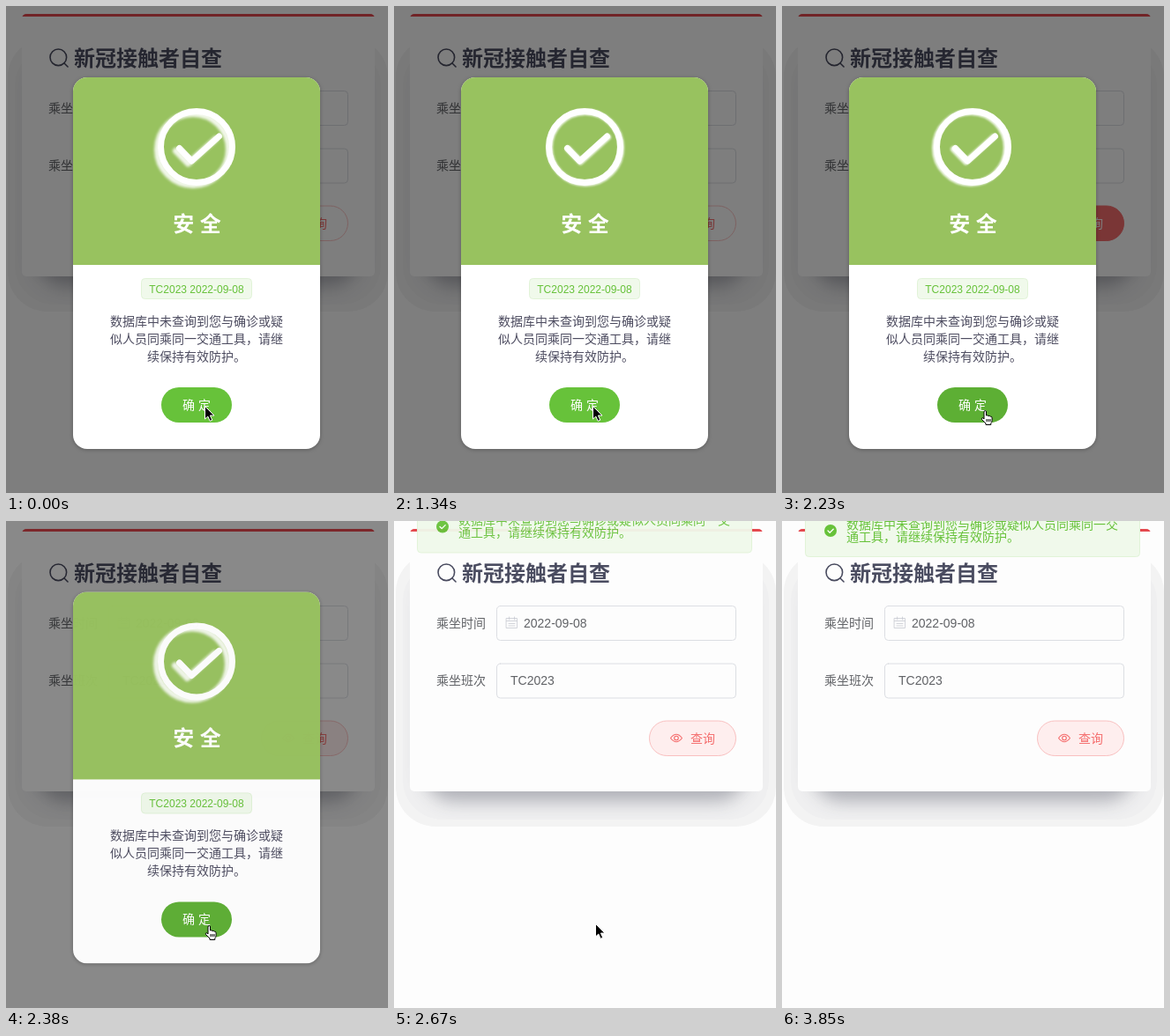
An HTML page for the animation above (4.6 s loop, 433 by 553 pixels).

```html
<!DOCTYPE html>
<html lang="zh">
<head>
<meta charset="utf-8">
<style>
html, body { margin: 0; width: 100%; height: 100%; overflow: hidden; background: #fdfdfd; }
svg { display: block; width: 433px; height: 553px; font: 14px "Liberation Sans", "Noto Sans CJK SC", sans-serif; }
text { white-space: pre; }
.bold { font-size: 24px; font-weight: bold; }
.mid { text-anchor: middle; }
.line { fill: none; stroke-linecap: round; stroke-linejoin: round; }
.card { filter: drop-shadow(0 1px 2px #0004); }
</style>
</head>
<body>
<svg viewBox="0 0 433 553">
  <defs>
    <filter id="soft" x="-20%" y="-20%" width="140%" height="140%"><feGaussianBlur stdDeviation="10"/></filter>
    <clipPath id="round"><rect x="76" y="81" width="280" height="422" rx="16"/></clipPath>
    <clipPath id="panel"><rect x="18" y="9" width="400" height="298" rx="5"/></clipPath>
  </defs>

  <!-- search form -->
  <rect x="2" y="36" width="431" height="311" rx="45" fill="#f3f3f3"/>
  <rect x="10" y="46" width="415" height="293" rx="45" fill="#efeff0"/>
  <rect x="34" y="60" width="366" height="258" rx="34" fill="#3a3c50" opacity=".36" filter="url(#soft)"/>
  <g clip-path="url(#panel)">
    <rect x="18" y="9" width="400" height="298" fill="#fdfdfd"/>
    <rect x="18" y="9" width="400" height="3" fill="#e4484e"/>
  </g>
  <g class="line" stroke="#484a5e" stroke-width="1.6">
    <circle cx="59.3" cy="58.3" r="9.3"/><path d="M66 65l4 4"/>
  </g>
  <text class="bold" x="77" y="67.5" fill="#4a4c60">新冠接触者自查</text>
  <g fill="#606266">
    <text x="48" y="121">乘坐时间</text><text x="48" y="186">乘坐班次</text>
    <text x="147" y="120.5">2022-09-08</text><text x="132" y="186">TC2023</text>
  </g>
  <g class="line" stroke="#dcdee3">
    <rect x="116.5" y="96.5" width="271" height="39" rx="4"/>
    <rect x="116.5" y="162" width="271" height="39" rx="4"/>
  </g>
  <path class="line" stroke="#c8cbd2" stroke-width=".8" d="M127.5 110.5h12v11h-12zM127.5 113.5h12M130.5 109v3M136.5 109v3M130 116.5h7M130 119h7"/>
  <g id="query">
    <rect id="pill" x="289.5" y="227" width="98" height="39.5" rx="19.75"/>
    <g class="line" stroke="currentColor" stroke-width="1.1">
      <path d="M313.5 246.5q6.5-8.5 13 0q-6.5 8.5-13 0z"/><circle cx="320" cy="246.5" r="2.3"/>
    </g>
    <text x="336" y="251.5" fill="currentColor">查询</text>
  </g>

  <!-- success message -->
  <g id="toast">
    <rect x="26.5" y="-18.5" width="379" height="59" rx="4" fill="#f0f9eb" stroke="#e1f3d8"/>
    <circle cx="55" cy="11" r="7" fill="#67c23a"/>
    <path class="line" stroke="#fff" stroke-width="1.3" d="M52 11l2.2 2.2 4-4"/>
    <g fill="#67c23a">
      <text x="73" y="9">数据库中未查询到您与确诊或疑似人员同乘同一交</text>
      <text x="73" y="23">通工具，请继续保持有效防护。</text>
    </g>
  </g>

  <!-- result dialog -->
  <rect id="shade" width="433" height="553"/>
  <g id="dialog">
    <g class="card"><g clip-path="url(#round)">
      <rect x="76" y="81" width="280" height="422" fill="#fff"/>
      <rect x="76" y="81" width="280" height="213" fill="#98c25f"/>
    </g></g>
    <g id="badge" class="line" stroke="#fff" stroke-width="7">
      <circle cx="216" cy="160" r="40.5"/><path d="M196.5 161.5l14 14.5 31-28"/>
    </g>
    <text class="bold mid" x="216.5" y="255.5" fill="#fff">安 全</text>
    <rect x="153.5" y="309.5" width="125" height="23" rx="4" fill="#f0f9eb" stroke="#e1f3d8"/>
    <text class="mid" x="216" y="325.5" font-size="12" fill="#67c23a">TC2023 2022-09-08</text>
    <g class="mid" fill="#4d4c60">
      <text x="216" y="363">数据库中未查询到您与确诊或疑</text>
      <text x="216" y="383">似人员同乘同一交通工具，请继</text>
      <text x="216" y="403">续保持有效防护。</text>
    </g>
    <rect id="ok" x="176" y="433" width="80" height="40" rx="20"/>
    <text class="mid" x="216" y="458" fill="#fff">确 定</text>
  </g>

  <path id="arrow" stroke="#fff" d="M.5.5v14.5l3.300-3 2.400 5.300 2.600-1.100-2.400-5.200h4.600z"/>
  <path id="hand" transform="translate(225.5 459)" fill="#fff" stroke="#000" stroke-linejoin="round" d="M3.5 10V2q0-1.5 1.3-1.5T6 2v4q1.8-.8 2.4.5 1.6-.5 2.2.6 2-.3 2 1.7v3q0 1.7-1.3 3v1.7H5.5v-1.5L1 10.500q-.6-1.500.6-1.800 1 0 1.900 1.300zM6.500 10v3M8.500 10v3M10.500 10v3"/>
</svg>

<script>
const LOOP = 4600, STEP = 148.3;
const HOVER = 2070, PRESS = 2220, CLOSE = 2370, GONE = 2510;
const el = id => document.getElementById(id);
const set = (id, attrs) => { for (const k in attrs) el(id).setAttribute(k, attrs[k]); };
const clamp = v => Math.min(1, Math.max(0, v));
const ramp = (t, start, length) => clamp((t - start) / length);
const smooth = v => v * v * (3 - 2 * v);

function draw(t) {
  // the glow swings slowly to the right, then quickly back
  const dx = 4 * Math.tanh((t - 1150) / 400) - 8 * smooth(ramp(t, 1930, 450));
  const far = Math.abs(dx);
  el('badge').style.filter = `drop-shadow(${dx}px ${.5 + .75 * far}px ${.5 + .22 * far}px #fffd)`;

  const leave = smooth(ramp(t, CLOSE - 17, 200));
  set('dialog', { opacity: 1 - leave, transform: `translate(0 ${-20 * leave})` });
  set('shade', { opacity: .5 * (1 - ramp(t, CLOSE - 10, 150)) });
  set('ok', { fill: t < HOVER ? '#67c23a' : t < PRESS ? '#85ce61' : '#5daf34' });

  const [fill, stroke, color] = t < 1920 ? ['#fdfdfd', '#fbc4c4', '#f56c6c']
    : t < CLOSE ? ['#f56c6c', '#f56c6c', '#fff'] : ['#feeeee', '#f9c0c0', '#f56c6c'];
  set('pill', { fill, stroke });
  el('query').style.color = color;

  const rest = (1 - ramp(t, GONE + 10, 300)) ** 2;
  set('toast', { opacity: t < GONE ? 0 : 1 - .2 * rest, transform: `translate(0 ${-18 * rest})` });

  const moved = Math.max(0, t - 2800);
  const nudge = t < CLOSE ? 0 : 3;
  const x = 225 + nudge + 160 * (1 - Math.exp(-moved / 250));
  const y = 454 + nudge + .106 * moved;
  const link = t >= HOVER && t < GONE;
  set('arrow', { transform: `translate(${x} ${y})`, opacity: link ? 0 : 1 });
  set('hand', { opacity: link ? 1 : 0 });
}

function frame() {
  const now = performance.now() % LOOP;
  draw(Math.floor((now + 9) / STEP) * STEP);
  requestAnimationFrame(frame);
}
frame();
</script>
</body>
</html>
```
